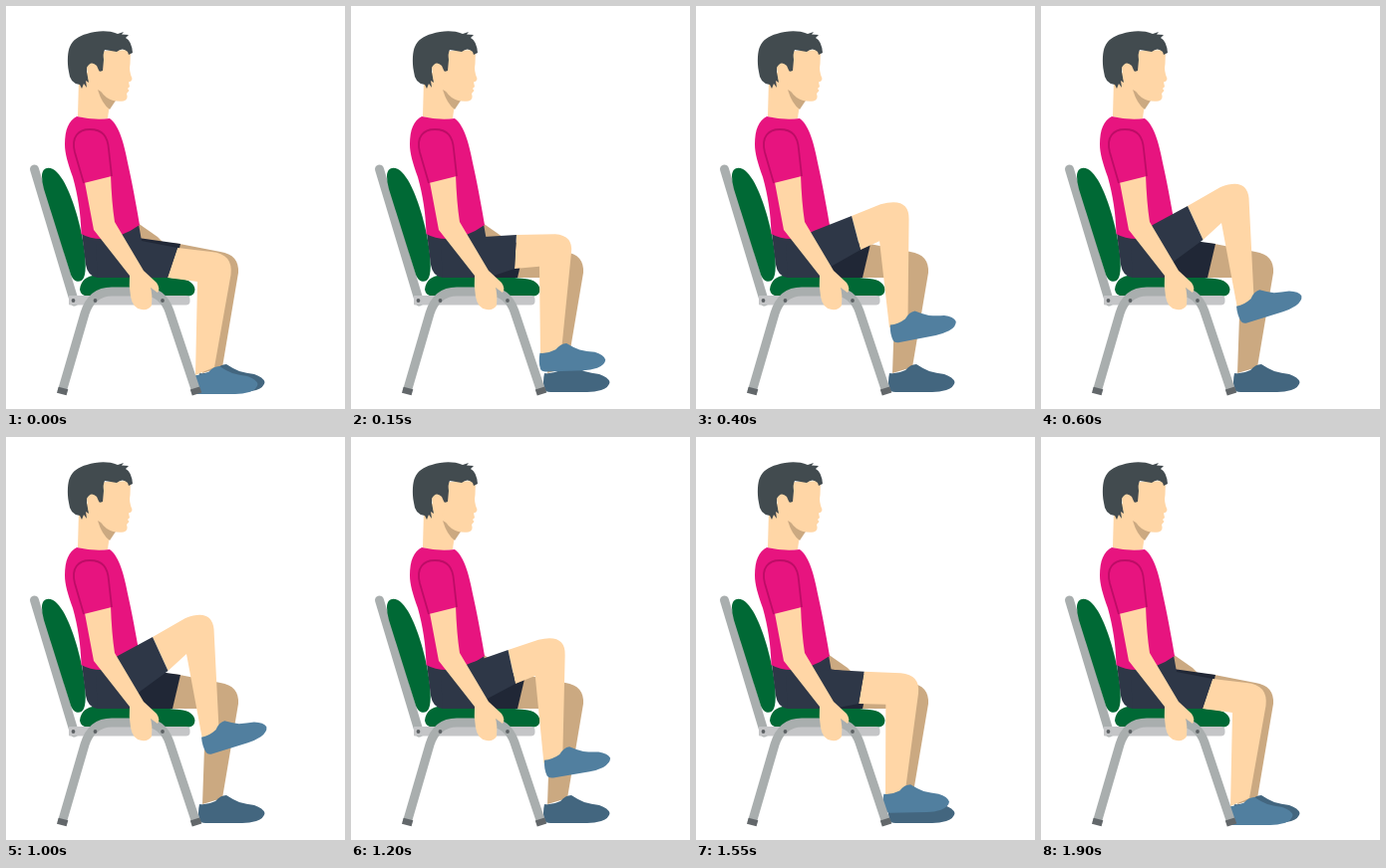
Animation of 340 by 405 pixels, one loop 2 s. Source, as an HTML page with a canvas:

```html
<!DOCTYPE html>
<html lang="en">
<head>
<meta charset="utf-8">
<title>Seated leg raise</title>
<style>
html, body { margin: 0; width: 100%; height: 100%; overflow: hidden; background: #fff; }
canvas { display: block; width: 340px; height: 405px; }
</style>
</head>
<body>
<canvas id="stage" width="340" height="405"></canvas>
<script>
const ctx = document.getElementById('stage').getContext('2d');
const LOOP = 2000, STEP = 50;
const skin = '#ffd6a6', tan = '#cba981', pink = '#e7147f', pinkLine = '#bd0c66';
const navy = '#2e3747', navyDark = '#202736', green = '#006935', hair = '#424b4f';
const steel = '#a9aeae', rail = '#c4c5c7', tip = '#62676a', bolt = '#5d6265';
const shoe = '#517f9f', shoeFar = '#43667f';

const shapes = {
  backPad: 'M36 171C36 162 44 160 51 167C62 178 71 206 76 230C80 250 81 266 78 273C75 279 68 278 65 270L38 184Q36 177 36 171Z',
  seat: 'M74 285C75 276 81 271 90 270.500C120 270 158 272 174 274C184 275 189 279 189.500 285Q189 291 183 291.500L82 291.500Q75 291 74 285Z',
  farShorts: 'M120 232L136 233.500L175 239L167 273L112 273Z',
  farLeg: 'M165 238L174 239L215 247Q234 250 233 268L217 363L197 369L199 311L192 273L165 273Z',
  farArm: 'M132 218L152 232L157 237L134 235Z',
  hips: 'M76 228L104 232L133 219L136 236L126 273L92 273Q82 272 80 260Z',
  shirt: 'M71 111Q88 115 104 113C114 120 119 141 123 162C128 185 132 208 134 220Q116 233 96 234Q84 234 75.500 229C75 208 72 190 67 172C62 158 59 148 59 139C59 124 63 115 71 111Z',
  neck: 'M73 74L72 111Q87 116 102 113L105 90L90 60Z',
  neckShade: 'M92 84L110 95L104 104Q96 98 92 84Z',
  face: 'M82 46L125 44L124.500 58Q123 65 126.500 73Q126 76 123 76.500L124 81L122 83L123.500 85L121 88Q123 94 118 95.500Q109 97 101 92Q94 87 92 77L82 72Z',
  ear: 'M81 62Q85 54 91 60L95 69L91 79L83 75Z',
  hair: 'M76 83L74 79Q64 78 63 66C61 56 62 45 64 41C67 34 73 30 81 28C91 25 102 24 112 28L118 26L116 28.500L123 29L120 32Q126 35 127 47L123 49L122 46Q117 41 111 46L99 44Q97 48 98 54L97 65Q93 67 91 64Q90 58 86 58Q81 59 81 66L83 77L80 75L81 82L78 78Z',
  arm: 'M79 177L105 170Q106 198 109 217L138 266L151 278Q155 284 152 288L145 283Q147 289 146 301Q143 306 136 305Q127 304 125 292Q123 281 124 271L88 225Z',
  sleeve: 'M78 178L69 147C65 131 73 124 84 124C97 124 102 131 103 144L106 171Z',
  sleeveLine: 'M78 178L69 147C65 131 73 124 84 124C97 124 102 131 103 144L106 171',
  back: 'M28.500 164L68.500 297',
  frame: 'M56 388L79 309Q86 287 106 287L139 287Q157 287 164 307L191 388',
  tips: 'M57.500 384L55.800 390M189.500 384L191.500 390',
  foot: 'M0 -17Q8 -16 16 -20Q21 -26 27 -26Q33 -22 40 -19Q47 -17 55 -16Q64 -13 65.500 -8Q65 -3 57 0Q50 2 43 2L6 2Q1 2 0 -1Q-2 -8 0 -17Z'
};
for (const k in shapes) shapes[k] = new Path2D(shapes[k]);

// Points: shorts start, shorts top, knee top, knee corner, shin top,
// ankle front, ankle back, knee pit, shorts bottom, crotch; foot x, y, degrees
const poses = [
  { at: 0, v: [136,236, 172,243, 206,247, 228,249, 225.5,270, 209,363, 190,371, 192,277, 162,273, 140,273, 187,388,0] },
  { at: .27, v: [133,232, 166,230, 205,229.5, 223,231, 221,248, 211,347, 190,354, 189,262, 164,264, 140,272, 190,366,-2] },
  { at: .73, v: [118,226, 156,211, 185,199, 214,191, 213.5,214, 212.5,317, 194,323, 184,236, 165,245, 135,262, 198,337,-11] },
  { at: 1, v: [112,220, 147,201, 180,182, 206,172, 208.5,193, 213.5,293, 197,304, 181,218, 162.5,235, 134,256, 201,318,-17] }
];
const lifts = [[0, 0], [550, 1], [1000, 1], [1200, .66], [1400, .33], [1500, .2], [1700, 0], [2000, 0]];

const mix = (a, b, u) => a + (b - a) * u;

function liftAt(t) {
  let i = 1;
  while (t > lifts[i][0]) i++;
  const [t0, a] = lifts[i - 1], [t1, b] = lifts[i];
  return mix(a, b, (t - t0) / (t1 - t0));
}

function poseAt(p) {
  let i = 1;
  while (p > poses[i].at) i++;
  const a = poses[i - 1], b = poses[i];
  const u = (p - a.at) / (b.at - a.at);
  return a.v.map((x, k) => mix(x, b.v[k], u));
}

function fill(name, color) {
  ctx.fillStyle = color;
  ctx.fill(shapes[name]);
}

function line(name, color, width, cap = 'butt') {
  ctx.strokeStyle = color;
  ctx.lineWidth = width;
  ctx.lineCap = cap;
  ctx.stroke(shapes[name]);
}

function foot(x, y, deg, color) {
  ctx.save();
  ctx.translate(x, y);
  ctx.rotate(deg * Math.PI / 180);
  fill('foot', color);
  ctx.restore();
}

function nearLeg(v) {
  const pt = i => [v[2 * i], v[2 * i + 1]];
  ctx.beginPath();
  ctx.moveTo(...pt(1));
  ctx.lineTo(...pt(2));
  ctx.quadraticCurveTo(...pt(3), ...pt(4));
  for (let i = 5; i < 9; i++) ctx.lineTo(...pt(i));
  ctx.fillStyle = skin;
  ctx.fill();
  foot(v[20], v[21], v[22], shoe);

  ctx.beginPath();
  ctx.moveTo(90, 240);
  for (const i of [0, 1, 8, 9]) ctx.lineTo(...pt(i));
  ctx.lineTo(124, 273);
  ctx.lineTo(92, 273);
  ctx.fillStyle = navy;
  ctx.fill();
}

function chairFrame() {
  ctx.fillStyle = rail;
  ctx.beginPath();
  ctx.roundRect(63, 291, 121.5, 9.5, [1, 4, 4, 1]);
  ctx.fill();
  line('frame', steel, 9);
  line('tips', tip, 10);
  ctx.fillStyle = bolt;
  for (const x of [67.5, 89.5, 157]) {
    ctx.beginPath();
    ctx.arc(x, 296, 1.9, 0, 7);
    ctx.fill();
  }
}

function draw(t) {
  ctx.fillStyle = '#fff';
  ctx.fillRect(0, 0, 340, 405);

  line('back', steel, 9, 'round');
  fill('backPad', green);
  fill('seat', green);

  fill('farLeg', tan);
  foot(194, 386, 0, shoeFar);
  fill('farArm', tan);
  fill('farShorts', navyDark);

  fill('neck', skin);
  fill('neckShade', tan);
  fill('face', skin);
  fill('hair', hair);
  fill('ear', skin);
  fill('hips', navy);
  fill('shirt', pink);

  nearLeg(poseAt(liftAt(t)));
  chairFrame();

  fill('arm', skin);
  fill('sleeve', pink);
  line('sleeveLine', pinkLine, 1.8);
}

const start = performance.now();
function tick() {
  const t = (performance.now() - start) % LOOP;
  draw(Math.floor(t / STEP) * STEP);
  requestAnimationFrame(tick);
}
tick();
</script>
</body>
</html>
```
